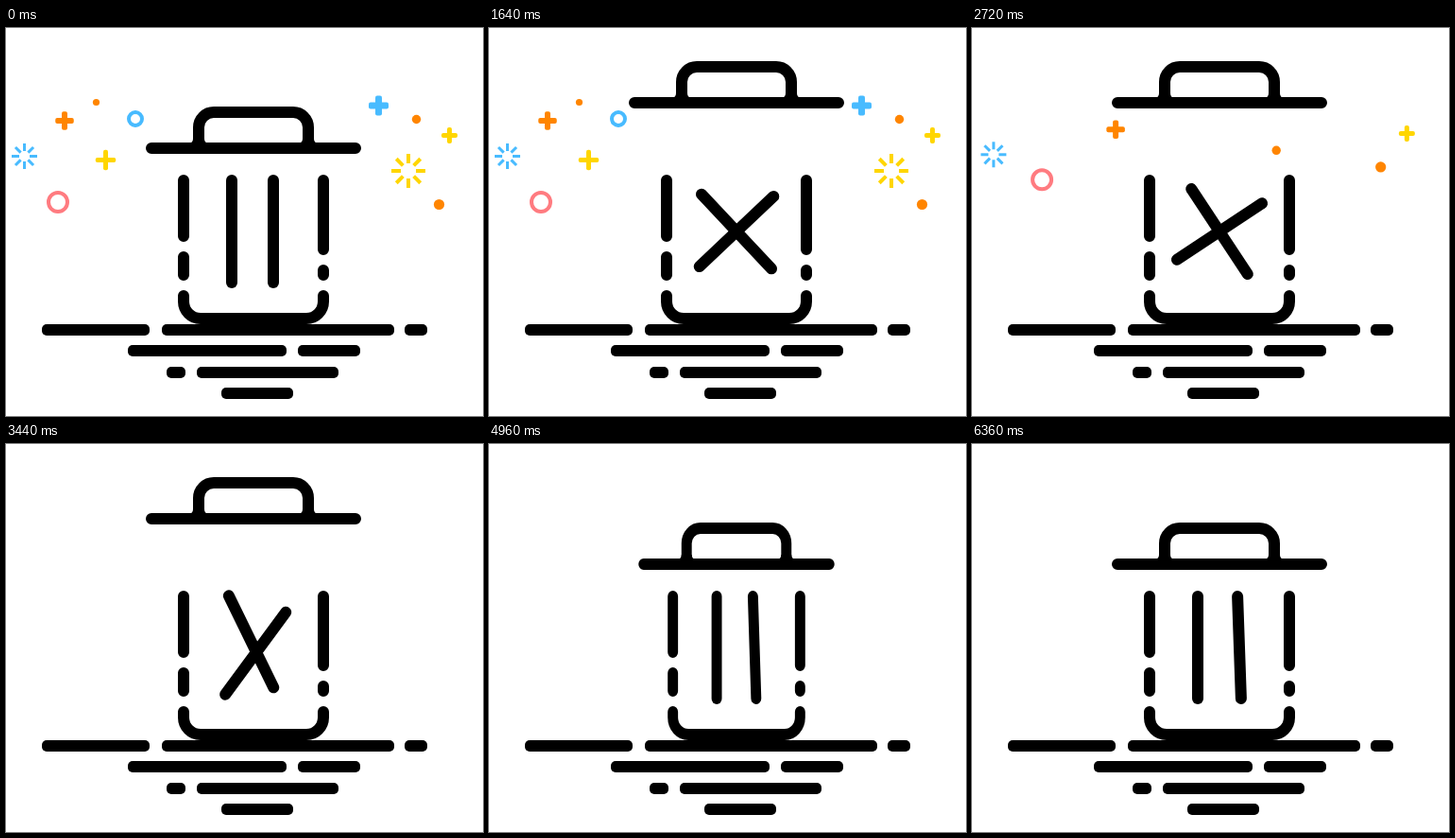
An HTML page that plays this animation: 505x410 px, repeating every 7200 ms.

```html
<!DOCTYPE html>
<html lang="en">
<head>
<meta charset="utf-8">
<title>Trash can</title>
<style>
  html, body { margin: 0; width: 100%; height: 100%; overflow: hidden; background: #fff; }
  svg { display: block; width: 505px; height: 410px; }
  .line { fill: none; stroke: #000; stroke-width: 12; stroke-linecap: round; }
</style>
</head>
<body>
<svg viewBox="0 0 505 410">
  <g id="ground"></g>
  <g id="particles"></g>
  <g id="can">
    <path class="line" d="M188 161V220M188 242V261M336 161V234M336 256V261
      M188 283V289A18 18 0 0 0 206 307H318A18 18 0 0 0 336 289V283"/>
    <g id="blades">
      <path class="line" d="M0-54V54"/>
      <path class="line" d="M0-54V54"/>
    </g>
    <g id="lid">
      <path class="line" d="M154 127H370M204 125V105A16 16 0 0 1 220 89H304A16 16 0 0 1 320 105V125"/>
      <path d="M194 122q4-1 4-5h12q0 4 4 5zM310 122q4-1 4-5h12q0 4 4 5z"/>
    </g>
  </g>
</svg>
<script>
const LOOP = 7200, FLIGHT = 520;
const CENTER = { x: 262, y: 215 };
const BLUE = '#48bbff', ORANGE = '#ff8500', YELLOW = '#ffd600', PINK = '#ff7b80';
const byId = id => document.getElementById(id);

const plus = (size, width) => color => {
  const bar = (w, h) => `<rect x="${-w / 2}" y="${-h / 2}" width="${w}" height="${h}" rx="2" fill="${color}"/>`;
  return bar(size, width) + bar(width, size);
};
const dot = r => color => `<circle r="${r}" fill="${color}"/>`;
const ring = r => color => `<circle r="${r}" fill="none" stroke="${color}" stroke-width="4"/>`;
const burst = (inner, outer, width) => color =>
  [0, 45, 90, 135, 180, 225, 270, 315].map(a =>
    `<path d="M${inner} 0H${outer}" stroke="${color}" stroke-width="${width}" transform="rotate(${a})"/>`).join('');

// x, y, height of the arc's control point, departure time, shape, color
const particles = [
  [137, 96, 75, 1640, ring(7), BLUE],
  [394.5, 82, 65, 1760, plus(21, 7), BLUE],
  [95.5, 78.5, 62, 1900, dot(3.6), ORANGE],
  [105.5, 139.5, 60, 2050, plus(21.5, 5), YELLOW],
  [426, 151, 45, 2190, burst(8, 18, 4), YELLOW],
  [434.5, 96.5, 75, 2425, dot(4.7), ORANGE],
  [62, 98, 78, 2495, plus(19.5, 6), ORANGE],
  [458.5, 186.5, -15, 2613, dot(5.6), ORANGE],
  [55, 184, 18, 2632, ring(10), PINK],
  [469.5, 113.5, 82, 2661, plus(17, 5), YELLOW],
  [19.5, 135.5, 60, 2688, burst(5.5, 13.5, 3), BLUE],
].map(([x, y, arc, start, shape, color]) => {
  const node = document.createElementNS('http://www.w3.org/2000/svg', 'g');
  node.innerHTML = shape(color);
  byId('particles').append(node);
  return { x, y, arc, start, node };
});

byId('ground').innerHTML = [
  [38, 152, 313], [165, 411, 313], [422, 446, 313],
  [129, 297, 335], [309, 375, 335],
  [170, 190, 358], [202, 352, 358],
  [228, 304, 380],
].map(([left, right, y]) =>
  `<rect x="${left}" y="${y}" width="${right - left}" height="12" rx="5"/>`).join('');

const progress = (t, start, end) => Math.min(1, Math.max(0, (t - start) / (end - start)));
const ease = (t, start, end) => {
  const p = progress(t, start, end);
  return p * p * (3 - 2 * p);
};
const bump = p => (1 - Math.cos(2 * Math.PI * p)) / 2;
const mix = (a, b, p) => a + (b - a) * p;
const bezier = (a, b, c, s) => a * (1 - s) ** 2 + 2 * b * s * (1 - s) + c * s * s;
const place = (node, value) => node.setAttribute('transform', value);

function drawParticles(t) {
  for (const { x, y, arc, start, node } of particles) {
    const s = ease(t, start, start + FLIGHT);
    const px = bezier(x, mix(x, CENTER.x, 0.6), CENTER.x, s);
    const py = bezier(y, arc, CENTER.y, s);
    place(node, `translate(${px} ${py})`);
    node.style.display = s < 1 ? '' : 'none';
  }
}

function drawBlades(t) {
  const [left, right] = byId('blades').children;
  const cross = ease(t, 400, 1200);
  const open = ease(t, 3200, 4040);
  const spread = 1 - cross + open ** 1.4;
  const lift = 10.6 * Math.sin(Math.PI * open);
  const leftTilt = -44 * (cross - ease(t, 3200, 3750));
  const rightTilt = 46 * cross - 48 * open;
  place(byId('blades'), `translate(${CENTER.x} ${CENTER.y}) rotate(${360 * ease(t, 1600, 3210)})`);
  place(left, `translate(${-23 * spread} ${-lift}) rotate(${leftTilt})`);
  place(right, `translate(${21 * spread} ${lift}) rotate(${rightTilt})`);
}

function drawCan(t) {
  const raised = ease(t, 400, 800) - ease(t, 4050, 4400);
  const hop = bump(progress(t, 5800, 6360));
  const squeeze = 1 - 0.108 * bump(2 * progress(t, 4800, 5680));
  place(byId('lid'), `translate(0 ${-48 * raised - 14 * hop})`);
  place(byId('can'), `translate(${CENTER.x} 0) scale(${squeeze} 1) translate(${-CENTER.x} 0)`);
}

function frame() {
  const t = performance.now() % LOOP;
  drawParticles(t);
  drawBlades(t);
  drawCan(t);
  requestAnimationFrame(frame);
}
frame();
</script>
</body>
</html>
```
